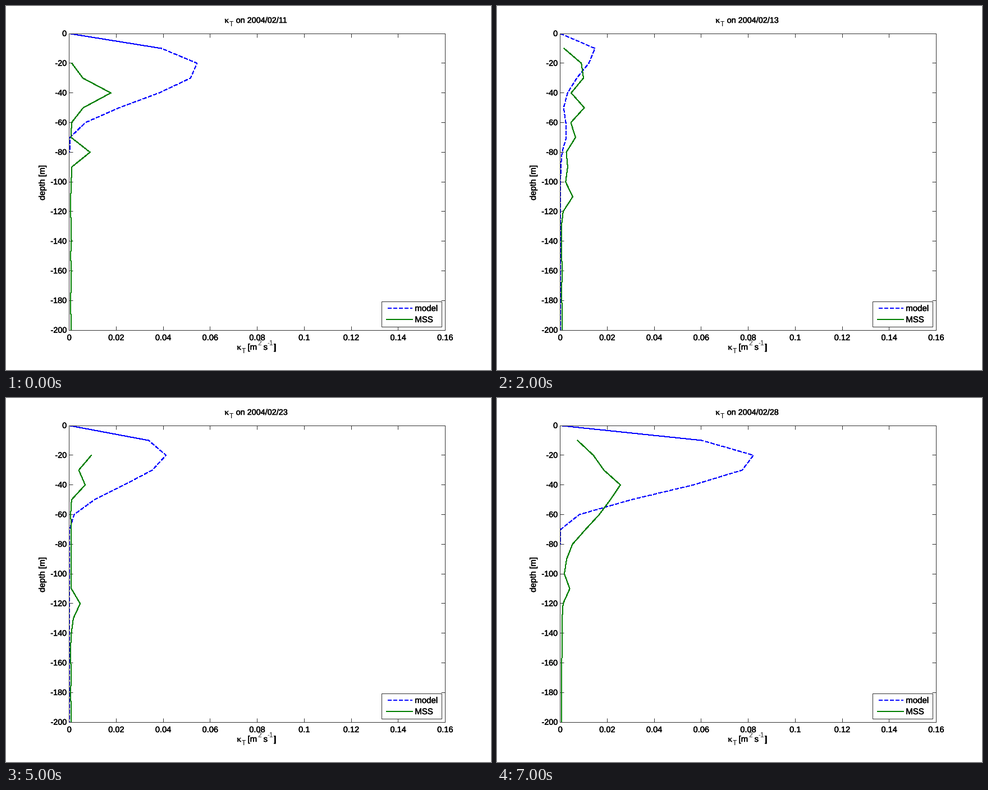
These frames come from a looping animation (864 by 648 pixels, 8000 ms). A matplotlib script:

```python
import numpy as np
import matplotlib.pyplot as plt
from matplotlib.animation import FuncAnimation
from matplotlib.lines import Line2D
from matplotlib.patches import Rectangle
from matplotlib.patheffects import withStroke
from matplotlib.transforms import Affine2D

W, H, DPI = 864, 648, 108
PX = 72 / DPI  # one pixel in points
BLUE, GREEN, FRAME = "#0000ff", "#007f00", "#333333"
DASH = (0, (6.5 * PX, 3 * PX))

plt.rcParams.update({
    "font.family": "Liberation Sans",
    "axes.linewidth": PX,
    "axes.edgecolor": FRAME,
    "lines.scale_dashes": False,
})

rng = np.random.default_rng(4)
z = np.arange(0, 201, 10.0)  # depth in m


def bumps(peaks):
    """Sum of Gaussian peaks given as (depth, height, width)."""
    return sum((a * np.exp(-((z - c) / w) ** 2 / 2) for c, a, w in peaks),
               np.zeros_like(z))


def mixed_layer(k10, h, q, p):
    """z^q (1 - z/h)^p, scaled to k10 at 10 m and zero below depth h."""
    shape = z ** q * np.clip(1 - z / h, 0, 1) ** p
    return k10 * shape / shape[1]


def cast(day, layer, end, start, peaks, deep=()):
    """One day's profiles: model down to depth end, MSS from depth start."""
    model = mixed_layer(*layer) + bumps(deep) + 0.15 * (z > 0)
    mss = bumps(peaks) + rng.uniform(0.3, 0.9, z.size)
    return (day, np.where(z <= end, model, np.nan),
            np.where(z >= start, mss, np.nan))


casts = [
    cast("11", (39.1, 72, 1.03, 2.2), 80, 20, [(40, 17, 6.6), (80, 8, 4)]),
    cast("11", (39.3, 72, 1.03, 2.2), 80, 10, [(40, 13, 9), (80, 12, 6)]),
    cast("13", (14.6, 80, 0.78, 4.8), 200, 10,
         [(25.5, 11.5, 7), (50, 9.3, 6.5), (70, 5.8, 5), (90, 2.8, 7),
          (110, 4.6, 4.5)], deep=[(66, 2.7, 8)]),
    cast("22", (43.9, 108, 0.85, 2.57), 110, 10,
         [(19, 17, 13), (46, 9.5, 9), (76.5, 26.5, 7.8)]),
    cast("22", (51.3, 108, 0.82, 2.65), 110, 30,
         [(30, 30, 10), (57.1, 123, 5.75), (86, 10.5, 7), (107, 124, 3.61)]),
    cast("23", (33.6, 67, 0.88, 2.13), 200, 20,
         [(18, 9, 7), (38.5, 6.5, 5), (121, 4.2, 5.5)]),
    cast("25", (46, 68, 0.94, 2.08), 80, 10, [(40, 13, 14), (112, 3, 5)]),
    cast("28", (60.1, 69, 0.99, 2.02), 80, 10,
         [(20, 4.5, 10), (40, 4.5, 4.5), (46, 20.5, 20), (110, 3.4, 5)]),
]

fig = plt.figure(figsize=(W / DPI, H / DPI), dpi=DPI, facecolor="white")
stage = Affine2D().scale(1 / W, -1 / H).translate(0, 1) + fig.transFigure
heavy = [withStroke(linewidth=0.5 * PX, foreground="black")]


def label(x, y, s, size=15, **kw):
    """Text with its baseline at stage pixel (x, y)."""
    return fig.text(x, y, s, transform=stage, fontsize=size * PX,
                    va="baseline", **kw)


def strong(*args, **kw):
    return label(*args, path_effects=heavy, **kw)


def kappa(x, y):
    strong(x, y, "κ", family="Liberation Serif")
    label(x + 8.5, y + 5.5, "T", 12)


# Axes frame and ticks
ax = fig.add_axes([0.13, 0.11, 0.775, 0.815])
ax.set_xlim(0, 160)
ax.set_ylim(-200, 0)
ax.set_xticks(range(0, 161, 20))
ax.set_yticks(range(-200, 1, 20))
ax.tick_params(direction="in", length=7 * PX, width=PX, color=FRAME, top=True,
               right=True, labelbottom=False, labelleft=False)

for k in range(9):
    strong(112.8 + 83.7 * k, 595, f"{0.02 * k:g}", 14.6, ha="center")
for k in range(11):
    strong(108, 53.7 + 52.8 * k, f"{-20 * k}", 14.4, ha="right")

# Title and axis labels
kappa(389.5, 30)
title = strong(409.7, 30, "", 14.4)
kappa(411.5, 612)
strong(430.5, 612, "[m")
label(448, 604, "2", 12, color="#333333")
strong(458.5, 612, "s")
label(466, 604, "-1", 12, color="#333333")
strong(476.5, 612, "]")
strong(69, 314.5, "depth [m]", rotation=90, rotation_mode="anchor",
       ha="center")

# Legend
fig.add_artist(Rectangle((669, 526), 107, 45, transform=stage, fc="white",
                         ec=FRAME, lw=PX))
for x, y, color, style, name in [(680, 538, BLUE, DASH, "model"),
                                 (678, 558, GREEN, "-", "MSS")]:
    fig.add_artist(Line2D([x, 724], [y, y], transform=stage, color=color,
                          linestyle=style, lw=1.5 * PX, antialiased=False))
    strong(728.3, y + 5, name)

# Curves, centred on pixels
centred = ax.transData + Affine2D().translate(0.5, -0.5)


def curve(color, style="-"):
    return ax.plot([], [], color=color, linestyle=style, lw=PX,
                   antialiased=False, transform=centred)[0]


model_line = curve(BLUE, DASH)
surface_line = curve(BLUE)
mss_line = curve(GREEN)


def update(i):
    day, model, mss = casts[i]
    title.set_text(f"on 2004/02/{day}")
    model_line.set_data(model, -z)
    # strong surface gradients show no dash gaps
    surface_line.set_data(model[:2], -z[:2])
    surface_line.set_visible(model[1] > 30)
    mss_line.set_data(mss, -z)
    return title, model_line, surface_line, mss_line


anim = FuncAnimation(fig, update, frames=len(casts), interval=1000,
                     repeat=True, repeat_delay=0, blit=False)
plt.show()
```
